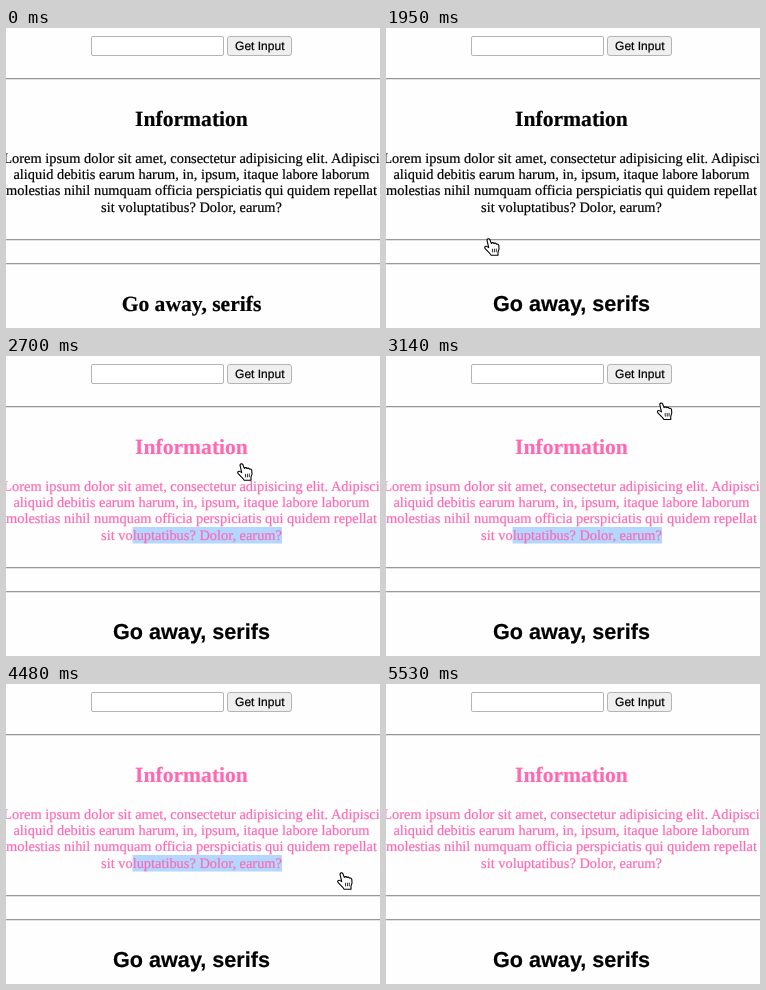
An HTML page that plays this animation: 374x300 px, repeating every 6.08 s.

```html
<!DOCTYPE html>
<html lang="en">
<head>
<meta charset="utf-8">
<title>Page events</title>
<style>
  html, body { margin: 0; height: 100%; overflow: hidden; background: #fefefe; }
  svg { display: block; width: 374px; height: 300px; }
  text { text-anchor: middle; text-rendering: geometricPrecision; stroke: currentColor; stroke-width: .2px; fill: currentColor; }
  #info, #title { font: 14.4px "Liberation Serif", Times, serif; }
  #info .head, #title { font-size: 21.6px; font-weight: bold; }
  #title.sans, .button { font-family: "Liberation Sans", Arial, sans-serif; }
  .button { font-size: 12px; }
  #info.pink { color: #ff69b4; }
</style>
</head>
<body>
<svg viewBox="0 0 374 300">
  <rect x="85.5" y="8.5" width="132" height="19" rx="1.5" fill="#fff" stroke="#b4b4b4"/>
  <rect x="221.5" y="8.5" width="64" height="19" rx="2.5" fill="#efefef" stroke="#b4b4b4"/>
  <text class="button" x="253.8" y="22.2">Get Input</text>

  <path d="M0 50.5H374M0 211.5H374M0 235.5H374" stroke="#999"/>
  <path d="M0 51.5H374M0 212.5H374M0 236.5H374" stroke="#e2e2e2"/>

  <rect id="selection" x="126.5" y="171" width="149.5" height="16.5" fill="#b3d7ff"/>
  <g id="info">
    <text class="head" x="185.5" y="98">Information</text>
    <text x="185.5" y="134.7">Lorem ipsum dolor sit amet, consectetur adipisicing elit. Adipisci</text>
    <text x="185.5" y="151">aliquid debitis earum harum, in, ipsum, itaque labore laborum</text>
    <text x="185.5" y="167.4">molestias nihil numquam officia perspiciatis qui quidem repellat</text>
    <text x="185.5" y="183.8">sit voluptatibus? Dolor, earum?</text>
  </g>
  <text id="title" x="185.5" y="283.3">Go away, serifs</text>

  <g id="hand" stroke="#000" stroke-linejoin="round">
    <path fill="#fff" stroke-width="1.1" d="M3 2.2C3 .6 5.3 .3 5.9 1.8L7.3 5.4C8 4.3 9.5 4.4 10 5.5C10.8 4.8 12 5 12.4 6.2C13.4 5.7 14.6 6.3 14.8 7.5C15.4 10 15.2 12 14 14.3V17.2H7C6.4 15 3 13 1 10.4C0 8.8 1.8 7.6 3.2 8.6L4.7 9.6Z"/>
    <path fill="none" stroke-width=".8" d="M8.4 10.8l.2 3.6M10.4 10.7l.1 3.6M12.3 10.6v3.6"/>
  </g>
</svg>
<script>
const LOOP = 6080, STEP = 149;
const [hand, info, title, selection] =
  ["hand", "info", "title", "selection"].map(id => document.getElementById(id));

// Turning points of the pointer: step, left, top.
const turns = [
  [7, 128, 281], [9, 128, 279], [13, 98, 210], [16, 172, 149], [18, 231, 107],
  [22, 284, 26], [25, 284, 26], [26, 296, 51], [28, 358, 281],
  [30, 331, 188], [32, 330, 186], [36, 309, 43]
];

function pointerAt(step) {
  const next = turns.findIndex(([s]) => s >= step);
  if (next < 1) return turns[0].slice(1);
  const [s0, x0, y0] = turns[next - 1], [s1, x1, y1] = turns[next];
  const k = (step - s0) / (s1 - s0);
  return [x0 + (x1 - x0) * k, y0 + (y1 - y0) * k];
}

function draw(now) {
  const step = Math.floor(now % LOOP / STEP);
  const visible = step >= 7 && step <= 36;
  hand.style.display = visible ? "" : "none";
  if (visible) hand.setAttribute("transform", `translate(${pointerAt(step)})`);

  title.classList.toggle("sans", step >= 7);
  info.classList.toggle("pink", step >= 15);
  selection.style.display = step >= 15 && step < 32 ? "" : "none";
  requestAnimationFrame(draw);
}
draw(performance.now());
</script>
</body>
</html>
```
